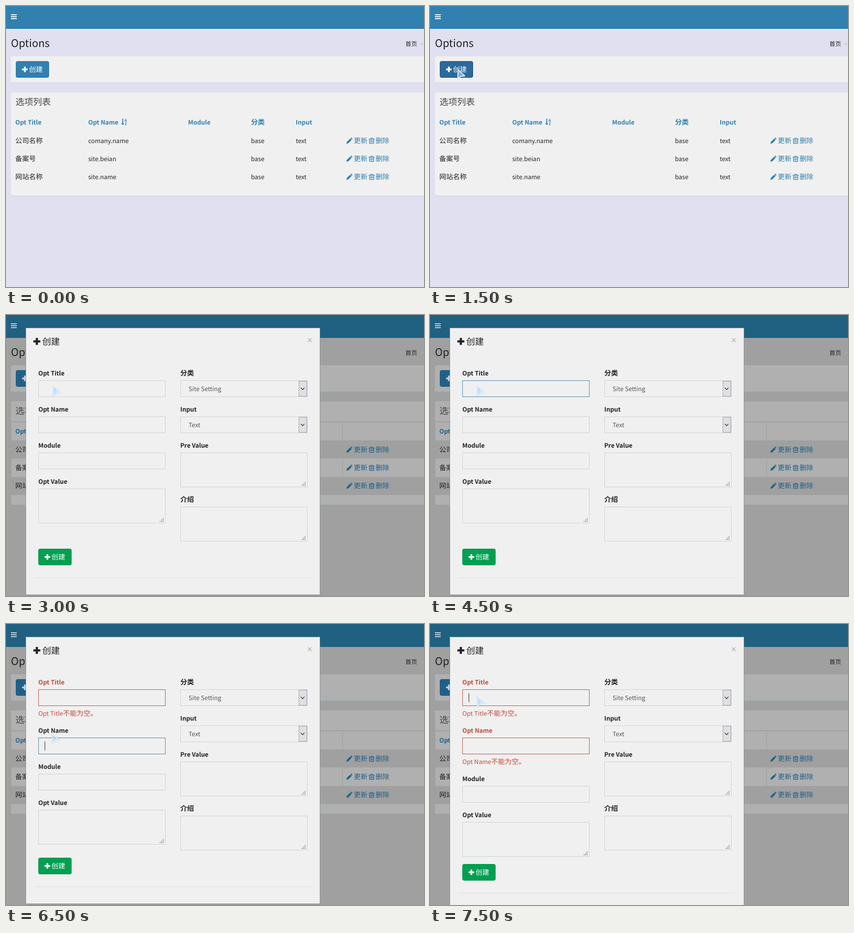
Recreate the animation shown at these times as an HTML page. Size 854 px wide and 576 px high, loop 8000 ms.

```html
<!DOCTYPE html>
<html lang="zh">
<head>
<meta charset="utf-8">
<title>Options</title>
<style>
html, body { margin: 0; width: 100%; height: 100%; overflow: hidden; background: #e0e0f0; }
svg { display: block; width: 100%; height: 100%; }
text {
  font-family: "Noto Sans CJK SC", "Noto Sans CJK JP", "Noto Sans CJK", sans-serif;
  font-size: 12.53px;
  text-rendering: geometricPrecision;
}
.zh { font-size: 14px; }
.big { font-size: 18px; }
.bold { font-weight: 700; }
.field { fill: #f0f0f0; stroke: #d0d0d0; }
.drop { fill: #e0e0e0; stroke: #a0a0b8; }
.error { fill: #c04a3c; }

/* every change is a hard cut */
.anim { animation: 8s step-end infinite; }
.open { animation-name: open; }
.bar { animation-name: bar; }
.link { animation-name: link; }
.pale { animation-name: pale; }
.create { animation-name: create; }
.cursor { animation-name: cursor; }
.title-field { animation-name: title-field; }
.name-field { animation-name: name-field; }
.title-label { animation-name: title-label; }
.name-label { animation-name: name-label; }
.title-error { animation-name: title-error; }
.name-error { animation-name: name-error; }
.title-caret { animation-name: title-caret; }
.name-caret { animation-name: name-caret; }
.name-row { animation-name: name-row; }
.rest { animation-name: rest; }
.foot { animation-name: foot; }
.panel { animation-name: panel; }

@keyframes open { 0% { visibility: hidden } 25%, 100% { visibility: visible } }
@keyframes bar { 0% { fill: #3080b0 } 25%, 100% { fill: #206080 } }
@keyframes link { 0% { fill: #3080b0 } 25%, 100% { fill: #206088 } }
@keyframes pale { 0% { fill: #fff } 25%, 100% { fill: #c4d0d8 } }
@keyframes create {
  0% { fill: #3080b0; stroke: #3070a0 }
  18.75% { fill: #2c6a9c; stroke: #204870 }
  25%, 100% { fill: #206088; stroke: #1c587c }
}
@keyframes cursor {
  0% { visibility: hidden; transform: translate(317px, 441px) }
  6.25% { visibility: visible; transform: translate(317px, 441px) }
  12.5% { visibility: visible; transform: translate(69px, 169px) }
  18.75% { visibility: visible; transform: translate(55px, 129px) }
  37.5% { visibility: visible; transform: translate(95px, 145px) }
  68.75% { visibility: visible; transform: translate(94px, 204px) }
  75% { visibility: visible; transform: translate(93px, 224px) }
  87.5%, 100% { visibility: visible; transform: translate(95px, 149px) }
}
@keyframes title-field {
  0% { stroke: #d0d0d0 } 43.75% { stroke: #4a88a8 } 81.25%, 100% { stroke: #b85444 }
}
@keyframes name-field {
  0% { stroke: #d0d0d0 } 81.25% { stroke: #4a88a8 } 93.75%, 100% { stroke: #b85444 }
}
@keyframes title-label { 0% { fill: #222 } 81.25%, 100% { fill: #c04a3c } }
@keyframes name-label { 0% { fill: #222 } 93.75%, 100% { fill: #c04a3c } }
@keyframes title-error { 0% { visibility: hidden } 81.25%, 100% { visibility: visible } }
@keyframes name-error { 0% { visibility: hidden } 93.75%, 100% { visibility: visible } }
@keyframes title-caret {
  0%, 56.25%, 68.75%, 81.25% { visibility: hidden }
  43.75%, 62.5%, 75%, 93.75%, 100% { visibility: visible }
}
@keyframes name-caret { 0%, 87.5%, 100% { visibility: hidden } 81.25% { visibility: visible } }
@keyframes name-row { 0% { transform: none } 81.25%, 100% { transform: translateY(25px) } }
@keyframes rest {
  0% { transform: none }
  81.25% { transform: translateY(25px) }
  93.75%, 100% { transform: translateY(50px) }
}
@keyframes foot { 0% { transform: none } 93.75%, 100% { transform: translateY(13px) } }
@keyframes panel { 0% { height: 546px } 93.75%, 100% { height: 559px } }
</style>
</head>
<body>
<svg viewBox="0 0 854 576" preserveAspectRatio="none">
  <defs>
    <path id="plus" d="M4 0h3.6v3.9h3.9v3.5H7.6v3.9H4V7.4H.1V3.9H4z"/>
    <g id="actions">
      <path d="M695.5 282.3l.8-3.7 6.9-6.9 2.9 2.9-6.9 6.9zM703.9 271l1-.9q.7-.5 1.4.1l1.2 1.3q.5.7 0 1.3l-.8 1z"/>
      <path fill-rule="evenodd" d="M741 272h3.3l.8-1.8h3.8l.8 1.8h3.3v1.2h-1v7.6q0 1.4-1.3 1.4h-7.4q-1.3 0-1.3-1.4v-7.6h-1zM745.4 272h3.2l-.4-.8h-2.4zM743.2 273.2v7.8h7.6v-7.8zM744.4 274.6h1v5.2h-1zM746.5 274.6h1v5.2h-1zM748.6 274.6h1v5.2h-1z"/>
      <text class="zh" x="710.5" y="281">更新</text>
      <text class="zh" x="755" y="281">删除</text>
    </g>
    <path id="grip" fill="#a0a0a0" d="M-3 0h2v2h-2zM-6 3h2v2h-2zM-3 3h2v2h-2zM-9 6h2v2h-2zM-6 6h2v2h-2zM-3 6h2v2h-2z"/>
    <g id="select">
      <rect class="field" x="356.5" y="134.5" width="259" height="33"/>
      <rect class="drop" x="598.5" y="135.5" width="16" height="31"/>
      <path d="M602.3 149.3l3.7 3.7 3.7-3.7" fill="none" stroke="#333" stroke-width="1.3"/>
    </g>
    <g id="area">
      <rect class="field" x=".5" y=".5" width="259" height="70"/>
      <use href="#grip" x="257" y="60"/>
    </g>
    <linearGradient id="ice" x2="1" y2=".4">
      <stop offset="0" stop-color="#8cc8f8" stop-opacity=".75"/>
      <stop offset="1" stop-color="#d8ecfc" stop-opacity=".45"/>
    </linearGradient>
  </defs>

  <!-- list page -->
  <rect width="854" height="576" fill="#e0e0f0"/>
  <rect y="47" width="854" height="2" fill="#ececf8"/>
  <path d="M854 103H13q-3 0-3 3v49q0 3 3 3h841zM854 177H13q-3 0-3 3v207q0 3 3 3h841z" fill="#d0d0d4"/>
  <path d="M854 103H13q-3 0-3 3v48q0 3 3 3h841zM854 177H13q-3 0-3 3v206q0 3 3 3h841z" fill="#f0f0f0"/>

  <!-- same page under the backdrop -->
  <g class="anim open">
    <rect width="854" height="576" fill="#a0a0a0"/>
    <path d="M854 103H13q-3 0-3 3v49q0 3 3 3h841zM854 177H13q-3 0-3 3v207q0 3 3 3h841z" fill="#90a4a8"/>
    <path d="M854 103H13q-3 0-3 3v48q0 3 3 3h841zM854 177H13q-3 0-3 3v206q0 3 3 3h841z" fill="#b0b0b0"/>
    <path d="M10 218h844v2H10zM0 257h854v37H0zM0 332h854v37H0zM687 220h1v112h-1zM10 220h1v112h-1z" fill="#a0a0a0"/>
  </g>

  <rect class="anim bar" width="854" height="47" fill="#3080b0"/>
  <path class="anim pale" d="M10 17h12v2H10zM10 21h12v2H10zM10 25h12v2H10z"/>
  <g fill="#222">
    <text x="10" y="84" style="font-size:21.5px">Options</text>
    <text x="816" y="82" style="font-size:12px">首页</text>
    <text x="847" y="82" fill="#b8b8c0" style="font-size:10.7px">&gt;</text>
    <text class="big" x="19.5" y="203" fill="#444">选项列表</text>
    <text class="zh" x="19" y="281">公司名称</text>
    <text class="zh" x="19" y="318">备案号</text>
    <text class="zh" x="19" y="355">网站名称</text>
    <text x="168" y="281">comany.name</text>
    <text x="168" y="318">site.beian</text>
    <text x="168" y="355">site.name</text>
    <g id="kind">
      <text x="500.5" y="281">base</text>
      <text x="592" y="281">text</text>
    </g>
    <use href="#kind" y="37"/>
    <use href="#kind" y="74"/>
  </g>
  <g class="anim link">
    <g class="bold">
      <text x="19" y="243">Opt Title</text>
      <text x="168" y="243">Opt Name</text>
      <text x="372" y="243">Module</text>
      <text class="zh" x="500.5" y="243">分类</text>
      <text x="592" y="243">Input</text>
      <text x="242.2" y="236.8" style="font-size:7.5px">A</text>
      <text x="242.4" y="244" style="font-size:7.5px">Z</text>
    </g>
    <path d="M237.5 231h2v9.5h2.2l-3.2 3.7-3.2-3.7h2.2z"/>
    <use href="#actions"/>
    <use href="#actions" y="37"/>
    <use href="#actions" y="74"/>
  </g>
  <rect class="anim create" x="20.5" y="113.5" width="67" height="33" rx="3"/>
  <g class="anim pale">
    <use href="#plus" x="32.7" y="124.3"/>
    <text class="zh" x="47" y="135">创建</text>
  </g>

  <!-- dialog -->
  <g class="anim open" fill="#222">
    <rect class="anim panel" x="41" y="27" width="600" height="546" fill="#f0f0f0" stroke="#80909c" stroke-opacity=".8" style="paint-order:stroke" stroke-width="2"/>
    <use href="#plus" transform="translate(55.8 47) scale(1.25)"/>
    <text class="big" x="74" y="61">创建</text>
    <path d="M616.8 47.8l7.4 7.4m0-7.4l-7.4 7.4" stroke="#c0c0c0" stroke-width="2"/>

    <text class="bold anim title-label" x="66" y="124">Opt Title</text>
    <rect class="field anim title-field" x="66.5" y="134.5" width="259" height="33"/>
    <g class="anim title-error">
      <text class="error" x="66" y="188">Opt Title<tspan class="zh">不能为空。</tspan></text>
    </g>
    <rect class="anim title-caret" x="79" y="142" width="1" height="18"/>

    <g class="anim name-row">
      <text class="bold anim name-label" x="66" y="198">Opt Name</text>
      <rect class="field anim name-field" x="66.5" y="208.5" width="259" height="33"/>
      <g class="anim name-error">
        <text class="error" x="66" y="262">Opt Name<tspan class="zh">不能为空。</tspan></text>
      </g>
      <rect class="anim name-caret" x="79" y="216" width="1" height="18"/>
    </g>

    <g class="anim rest">
      <text class="bold" x="66" y="272">Module</text>
      <rect class="field" x="66.5" y="282.5" width="259" height="33"/>
      <text class="bold" x="66" y="346">Opt Value</text>
      <use href="#area" x="66" y="356"/>
    </g>

    <text class="zh bold" x="356" y="124">分类</text>
    <use href="#select"/>
    <text x="373" y="156" fill="#555">Site Setting</text>
    <text class="bold" x="356" y="198">Input</text>
    <use href="#select" y="74"/>
    <text x="373" y="230" fill="#555">Text</text>
    <text class="bold" x="356" y="272">Pre Value</text>
    <use href="#area" x="356" y="282"/>
    <text class="zh bold" x="356" y="383">介绍</text>
    <use href="#area" x="356" y="393"/>

    <g class="anim foot">
      <rect x="66.5" y="479.5" width="67" height="33" rx="3" fill="#00a050" stroke="#009048"/>
      <g fill="#fff">
        <use href="#plus" x="78.7" y="490.3"/>
        <text class="zh" x="93" y="501">创建</text>
      </g>
      <rect x="58" y="538" width="566" height="1" fill="#e0e0e0"/>
    </g>
  </g>

  <g class="anim cursor" stroke-linejoin="round">
    <path d="M2 1.6V19.4L8 15.2 16 14.2z" fill="none" stroke="#80b8e8" stroke-opacity=".7" stroke-width="2.6"/>
    <path d="M2 1.6V19.4L8 15.2 16 14.2z" fill="url(#ice)" stroke="#f4faff" stroke-width="1.4"/>
  </g>
</svg>
</body>
</html>
```
